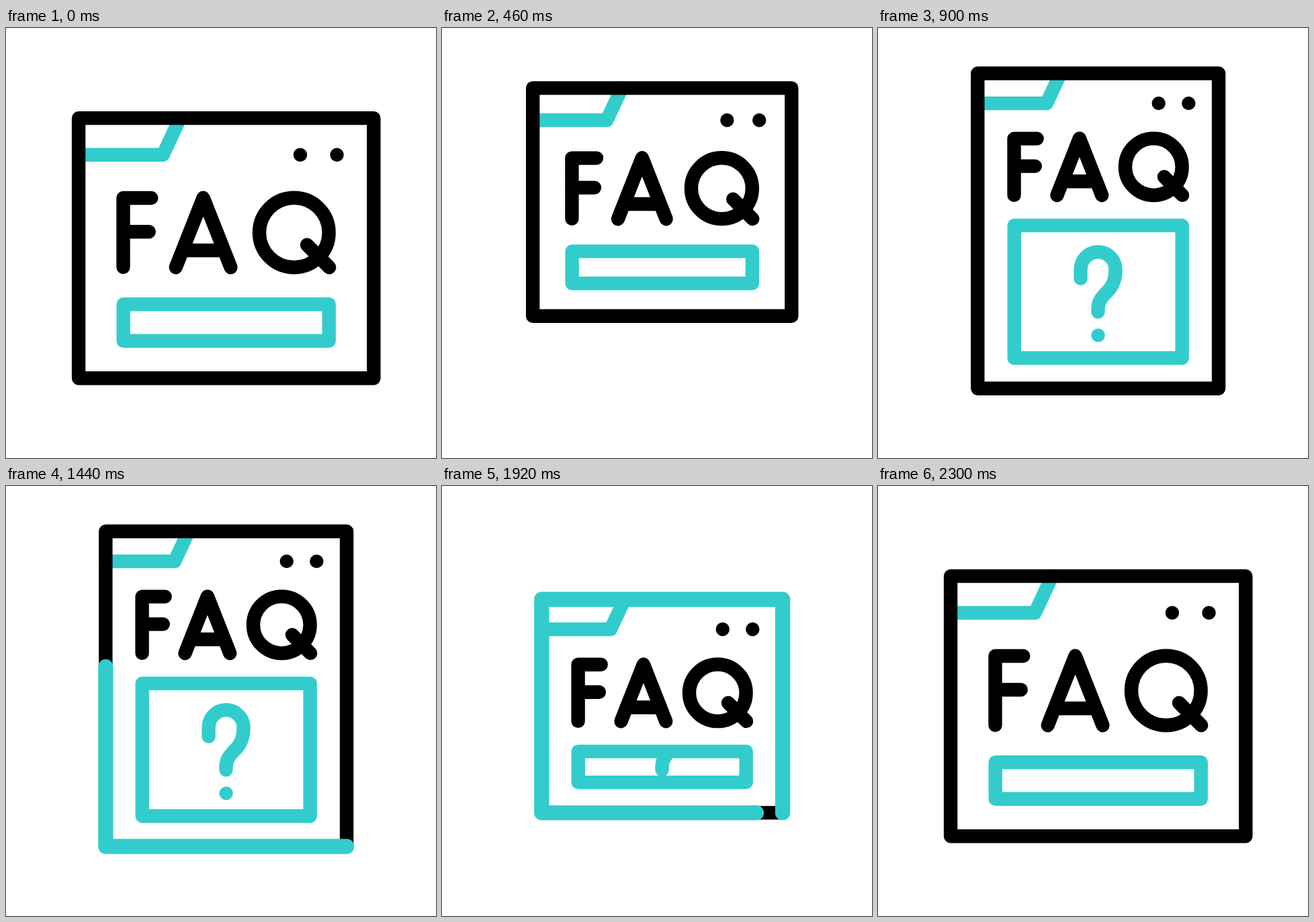
Animation, 640 px wide and 640 px high, one loop 2400 ms. Source, as an HTML page with a canvas:

```html
<!DOCTYPE html>
<html lang="en">
<head>
<meta charset="utf-8">
<title>FAQ window</title>
<style>
  html, body { margin: 0; width: 100%; height: 100%; overflow: hidden; background: #fff; }
  canvas { display: block; }
</style>
</head>
<body>
<canvas id="stage" width="640" height="640"></canvas>
<script>
const ctx = document.getElementById('stage').getContext('2d');
const LOOP = 2400;
const BLACK = '#000', TEAL = '#33cccc';
const WIDTH = 20.4, TRACE_WIDTH = 22.4;
const LEFT = 108.1, RIGHT = 547.3, TOP = 134.1, BOTTOM = 521.3, CENTER = 327.7;
const SMALL = 0.8167;    // scale of the narrow window
const GROWTH = 152.8;    // extra height when the panel is open

const TAB = 'M108 188.7H233.7L259.2 134.1';
const DOTS = 'M437.9 188.7h.01M492.5 188.7h.01';
const LETTERS = 'M174.5 356V253H216.3M174.5 303.2H212.8' +
  'M252.7 356.3L293.6 252.7L334.5 356.3M262.7 331H324.5' +
  'M480.6 304.5A51.8 51.8 0 1 1 377 304.5A51.8 51.8 0 1 1 480.6 304.5Z' +
  'M448 322.7L481.2 356.2';
const QUESTION = 'M301.6 372.8V359.3A26 26 0 0 1 353.6 359.3' +
  'C353.6 373 349 384.5 342.5 391C333 400.5 327.5 407 327.5 418V422.5M327.6 457.4h.01';

const progress = (t, from, to) => Math.min(1, Math.max(0, (t - from) / (to - from)));
const mix = (a, b, p) => a + (b - a) * p;

function stroke(path, color, width = WIDTH) {
  ctx.strokeStyle = color;
  ctx.lineWidth = width;
  ctx.stroke(path);
}

function draw(t) {
  const shrink = progress(t, 118.5, 628), open = progress(t, 628, 884);
  const close = progress(t, 1669, 1923.5), restore = progress(t, 2037, 2284);
  const traceEnd = progress(t, 1208, 1824), traceStart = progress(t, 1910, 2290);

  const scale = mix(1, SMALL, shrink - restore);
  const top = mix(mix(mix(TOP, 67.5, shrink), 169.7, close), TOP, restore);
  const grow = GROWTH * (open - close);

  // Points are scaled, line widths are not.
  const matrix = new DOMMatrix([scale, 0, 0, scale, CENTER * (1 - scale), top - TOP * scale]);
  const place = d => {
    const path = new Path2D();
    path.addPath(new Path2D(d), matrix);
    return path;
  };
  const bottom = BOTTOM + grow / scale;
  const frame = place(`M${RIGHT} ${bottom}H${LEFT}V${TOP}H${RIGHT}Z`);
  const panel = place(`M174.7 411.3H480.7V${465.8 + grow / scale}H174.7Z`);

  ctx.fillStyle = '#fff';
  ctx.fillRect(0, 0, 640, 640);
  ctx.lineCap = ctx.lineJoin = 'round';

  stroke(place(TAB), TEAL);
  stroke(place(DOTS), BLACK);
  stroke(place(LETTERS), BLACK);
  if (grow > 0) {
    ctx.save();
    ctx.clip(panel);
    stroke(new Path2D(QUESTION), TEAL);
    ctx.restore();
  }
  stroke(panel, TEAL);
  stroke(frame, BLACK);

  // Coloured line that runs around the frame.
  if (traceEnd > traceStart) {
    const length = 2 * scale * (RIGHT - LEFT + bottom - TOP);
    ctx.setLineDash([length * (traceEnd - traceStart), length * 2]);
    ctx.lineDashOffset = -length * traceStart;
    stroke(frame, TEAL, TRACE_WIDTH);
    ctx.setLineDash([]);
  }
}

function tick() {
  draw(performance.now() % LOOP);
  requestAnimationFrame(tick);
}
tick();
</script>
</body>
</html>
```
